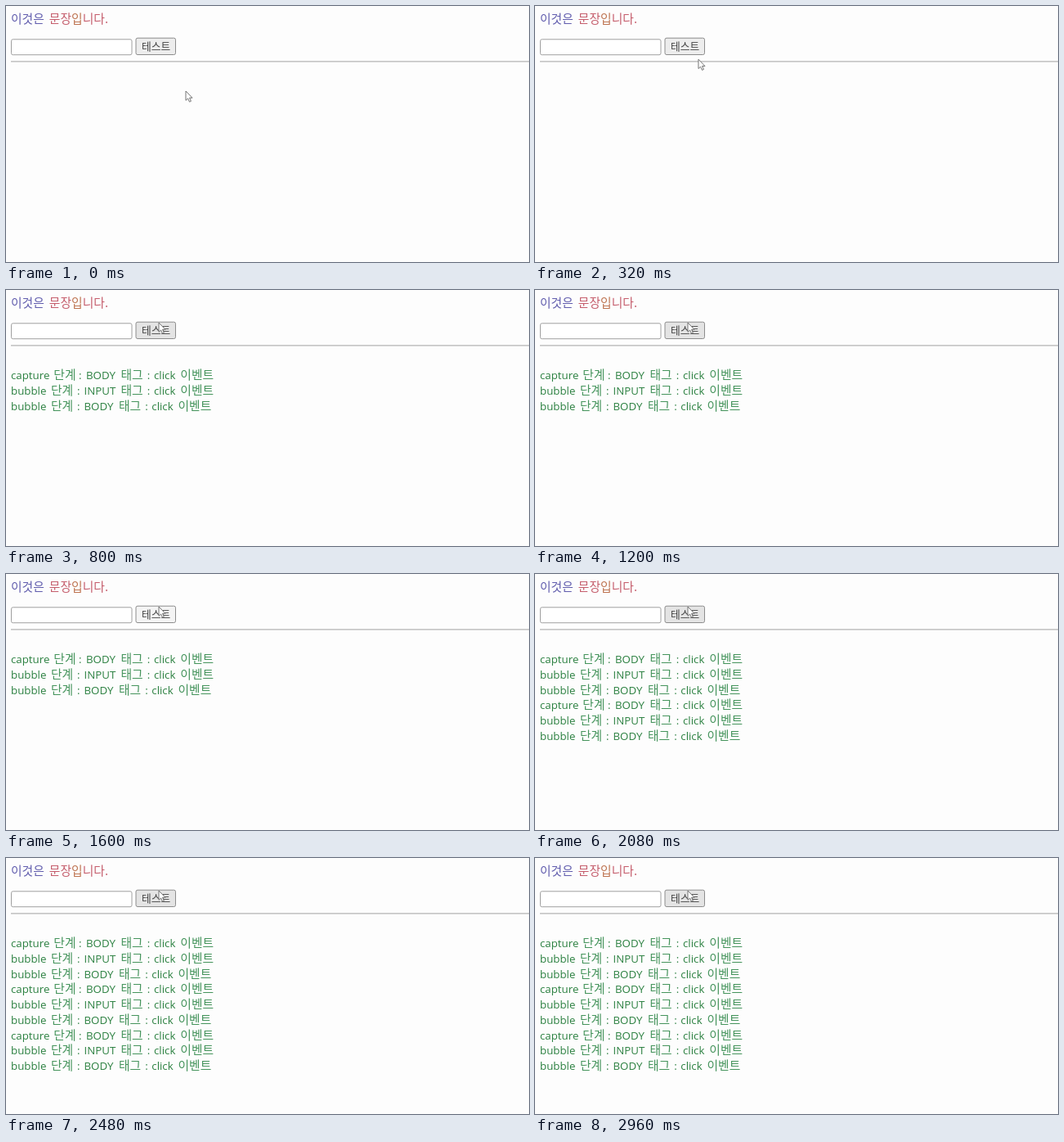
An HTML page that plays this animation: 640 px wide and 313 px high, repeating every 3040 ms.

```html
<!DOCTYPE html>
<html lang="ko">
<head>
<meta charset="utf-8">
<title>이벤트 단계</title>
<style>
  html, body { margin: 0; width: 100%; height: 100%; overflow: hidden; background: #fdfdfd; }
  svg { display: block; width: 100%; height: 100%; }
  text { font: 14.8px "Noto Sans CJK KR", "Noto Sans CJK", sans-serif; }
  #log { fill: #45945c; }
  #log .latin { font: 500 13.3px "Open Sans", "Noto Sans", sans-serif; fill: #2b8040; }
</style>
</head>
<body>
<svg viewBox="0 0 640 313">
  <text x="6" y="20.7" fill="#625eae">이것은</text>
  <text x="52.8" y="20.7" fill="#c55d6c">문장<tspan fill="#be7350">입</tspan>니다.</text>
  <rect x="6.5" y="40.8" width="147.5" height="18.9" rx="2" fill="#fff" stroke="#a0a0a0"/>
  <rect id="button" x="159" y="39.2" width="48.5" height="20.3" rx="2" stroke="#8c8c8c"/>
  <text x="166" y="54" style="font-size:12.8px" fill="#444">테스트</text>
  <path d="M6 67.8H640" stroke="#b4b4b4" stroke-width="1.2"/>
  <g id="log"></g>
  <path id="cursor" d="M0 0V11.4L2.6 9L4.5 13.2L6.4 12.4L4.6 8.3H8Z" fill="#fff" stroke="#666" stroke-width=".9"/>
</svg>
<script>
const LOOP = 3040, STEP = 80;
const MOVE_END = 560;
const START = [220, 104], END = [187, 40];
const CLICKS = [[640, 800], [1520, 1680], [2320, 2480]]; // press, release
const ENTRIES = [
  ["capture", "BODY", [6, 58.3, 89, 98, 140.5, 172.8, 181, 213.3]],
  ["bubble", "INPUT", [6, 55, 87, 95.5, 140.5, 172.8, 181, 213.3]],
  ["bubble", "BODY", [6, 55, 87, 95.5, 138, 170.3, 178.3, 210.5]],
];
const $ = id => document.getElementById(id);

function add(parent, name, attrs, content = "") {
  const node = document.createElementNS("http://www.w3.org/2000/svg", name);
  for (const key in attrs) node.setAttribute(key, attrs[key]);
  node.textContent = content;
  return parent.appendChild(node);
}

const groups = CLICKS.map((_, g) => {
  const group = add($("log"), "g", {});
  ENTRIES.forEach(([phase, tag, xs], i) => {
    const y = 109.2 + (g * 3 + i) * 18.75;
    [phase, "단계", ":", tag, "태그", ":", "click", "이벤트"].forEach((word, w) =>
      add(group, "text", { x: xs[w], y, class: /[가-힣]/.test(word) ? "" : "latin" }, word));
  });
  return group;
});

function draw(time) {
  const t = Math.floor((time % LOOP) / STEP) * STEP;
  const p = Math.min(t / MOVE_END, 1);
  const ease = p * p * (3 - 2 * p);
  const [x, y] = START.map((from, i) => from + (END[i] - from) * ease);
  $("cursor").setAttribute("transform", `translate(${x} ${y})`);

  const pressed = CLICKS.some(([down, up]) => t >= down && t < up);
  const hover = y < 60;
  $("button").setAttribute("fill", pressed ? "#f4f4f4" : hover ? "#e4e4e4" : "#ededed");
  groups.forEach((group, i) =>
    group.setAttribute("visibility", t >= CLICKS[i][1] ? "visible" : "hidden"));
}

const origin = performance.now();
function tick() {
  draw(performance.now() - origin);
  requestAnimationFrame(tick);
}
tick();
</script>
</body>
</html>
```
